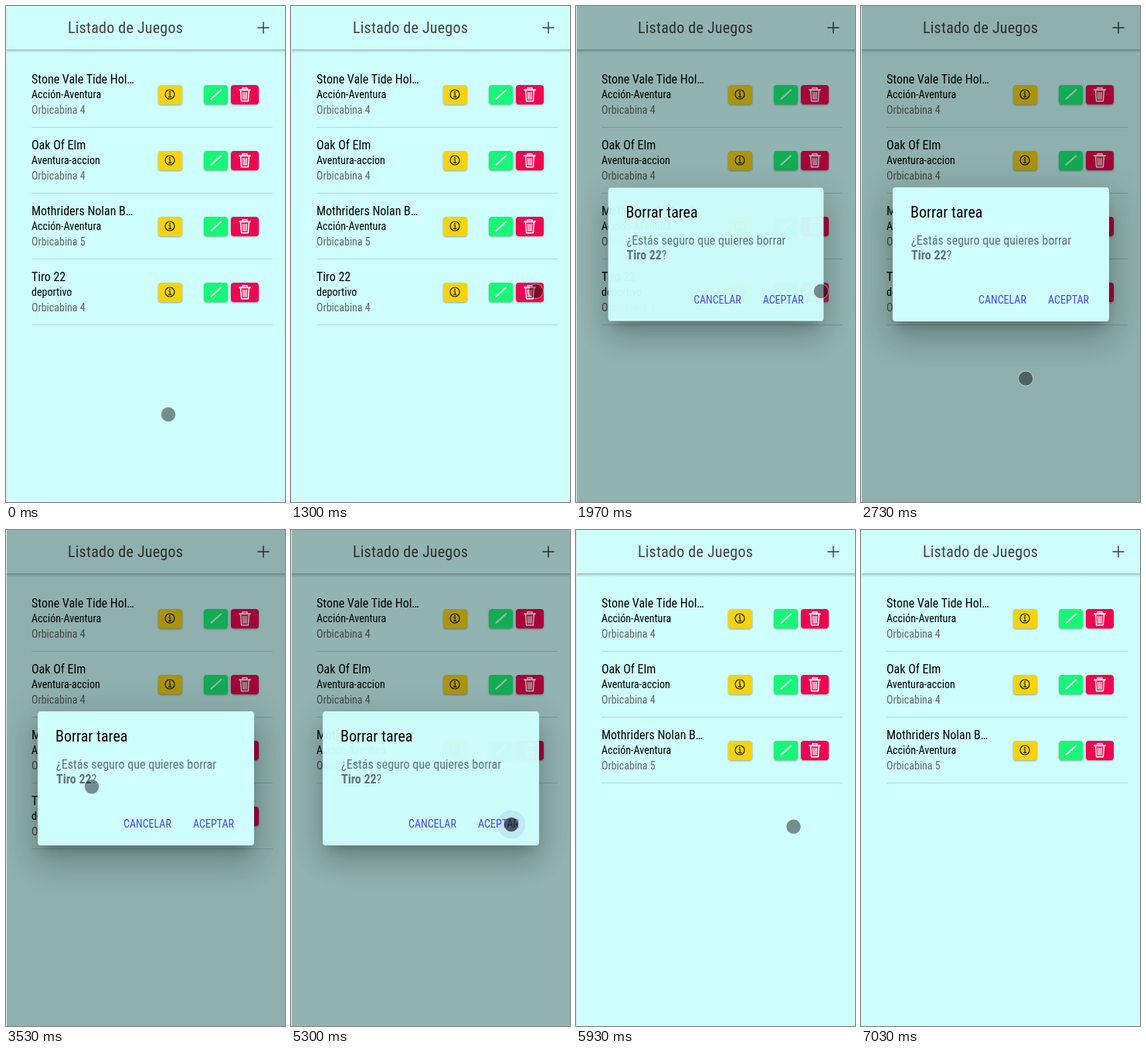
An HTML page for the animation above (8 s loop, 361 px wide and 640 px high).

```html
<!DOCTYPE html>
<html lang="es">
<head>
<meta charset="utf-8">
<title>Listado de Juegos</title>
<style>
  html, body { margin: 0; width: 100%; height: 100%; overflow: hidden; background: #cefffc; }
  #stage { position: relative; width: 361px; height: 640px; overflow: hidden; background: #cefffc; }
  svg { position: absolute; left: 0; top: 0; overflow: visible; }
  text, .probe { font-family: "Roboto Condensed", Roboto, sans-serif; font-stretch: 75%; white-space: pre; }
  text { transform-box: fill-box; transform-origin: 0 0; transform: scaleX(var(--narrow, 1)); }
  .probe { position: absolute; visibility: hidden; font-size: 100px; }
  .probe.wide { font-family: Roboto, sans-serif; font-stretch: 100%; }
  .bar { font-size: 20px; letter-spacing: .0125em; fill: #424242; }
  .name { font-size: 16px; }
  .kind { font-size: 14px; }
  .console { font-size: 14px; fill: #666; }
  .btn { filter: drop-shadow(0 1px 1.3px rgba(0, 0, 0, .35)); }
  #dim { position: absolute; left: 1px; top: 0; width: 360px; height: 640px; background: #000; }
  #dialog {
    position: absolute; left: 41px; top: 234px; width: 280px; height: 173px;
    border-radius: 4px; background: #cefffc;
    box-shadow: 0 11px 15px -7px rgba(0, 0, 0, .2), 0 24px 38px 3px rgba(0, 0, 0, .14), 0 9px 46px 8px rgba(0, 0, 0, .12);
  }
  .head { font-size: 20px; }
  .msg { font-size: 16px; fill: #5d7371; }
  .msg tspan { font-weight: 700; }
  .act { font-size: 14px; fill: #4747d9; }
</style>
</head>
<body>
<div id="stage">
  <svg width="361" height="640">
    <defs>
      <linearGradient id="edge" x2="0" y2="1">
        <stop stop-opacity=".3"/>
        <stop offset=".35" stop-opacity=".12"/>
        <stop offset="1" stop-opacity="0"/>
      </linearGradient>
      <clipPath id="trashClip"><rect x="291" y="357" width="36" height="25" rx="4"/></clipPath>
      <clipPath id="okClip"><rect x="232" y="359" width="73" height="40" rx="2"/></clipPath>
      <g id="tools">
        <g class="btn">
          <rect x="197" y="102" width="31" height="25" rx="4" fill="#f6d30e"/>
          <rect x="256" y="102" width="31" height="25" rx="4" fill="#17f777"/>
          <rect x="291" y="102" width="36" height="25" rx="4" fill="#ec0650"/>
        </g>
        <g fill="none" stroke="#222" stroke-width="1.2">
          <circle cx="212" cy="114" r="6"/>
          <path d="M210.5 113h1.7v4M210.2 117.3h4"/>
          <circle cx="212" cy="110.7" r=".4"/>
        </g>
        <path d="M265.5 119.8L276.3 110M277.3 109.1l.8-.7" stroke="#e4fff0" stroke-width="2.2" stroke-linecap="round"/>
        <g fill="none" stroke="#fff" stroke-linecap="round" stroke-linejoin="round">
          <path stroke-width="1.9" d="M302 108.3h14"/>
          <path stroke-width="1.5" d="M306 107.5v-1.8h6v1.8M303.7 109.5l.9 13.3h8.8l.9-13.3"/>
          <path stroke-width="1.3" d="M306.7 111.5l.3 8.8M309 111.5v8.8M311.3 111.5l-.3 8.8"/>
        </g>
      </g>
    </defs>
    <rect width="1" height="640" fill="#e2e8e8"/>
    <rect x="1" y="56" width="360" height="5" fill="url(#edge)"/>
    <text class="bar" x="80" y="35">Listado de Juegos</text>
    <path d="M325.5 28h15M333 20.5v15" stroke="#424242" stroke-width="1.5"/>
    <g id="rows"></g>
    <g clip-path="url(#trashClip)"><circle id="trashRipple" cx="317" cy="368" fill="#fff" fill-opacity=".15"/></g>
  </svg>
  <div id="dim"></div>
  <div id="dialog">
    <svg width="280" height="173" viewBox="41 234 280 173">
      <text class="head" x="64" y="273">Borrar tarea</text>
      <text class="msg" x="65" y="308">¿Estás seguro que quieres borrar</text>
      <text class="msg" x="65" y="327"><tspan>Tiro 22</tspan>?</text>
      <g clip-path="url(#okClip)"><circle id="okRipple" cx="285" cy="380" fill="#4747d9" fill-opacity=".1"/></g>
      <text class="act" x="152" y="384">CANCELAR</text>
      <text class="act" x="242" y="384">ACEPTAR</text>
    </svg>
  </div>
  <svg width="361" height="640">
    <circle id="cursor" r="9.5" stroke="#fff" stroke-opacity=".45"/>
  </svg>
  <span class="probe">Listado</span><span class="probe wide">Listado</span>
</div>
<script>
const $ = id => document.getElementById(id);
const LOOP = 8000;

const games = [
  ['Stone Vale Tide Hol…', 'Acción-Aventura', 'Orbicabina 4'],
  ['Oak Of Elm', 'Aventura-accion', 'Orbicabina 4'],
  ['Mothriders Nolan B…', 'Acción-Aventura', 'Orbicabina 5'],
  ['Tiro 22', 'deportivo', 'Orbicabina 4']
];
$('rows').innerHTML = games.map(([name, kind, machine], i) => `
  <g transform="translate(0 ${i * 85})">
    <text class="name" x="33" y="100">${name}</text>
    <text class="kind" x="33" y="119">${kind}</text>
    <text class="console" x="33" y="139">${machine}</text>
    <use href="#tools"/>
    <rect x="33" y="156" width="312" height="1" fill-opacity=".14"/>
  </g>`).join('');
const lastRow = $('rows').lastElementChild;

// Without a condensed face, narrow the regular one evenly.
const [slim, wide] = [...document.querySelectorAll('.probe')].map(p => p.offsetWidth);
if (slim > wide * .95) document.documentElement.style.setProperty('--narrow', .885);

// Pointer moves: start, step length, step count, Bezier points.
const moves = [
  [330, 100, 9, [210, 527], [155, 490], [230, 400], [297, 377]],
  [1300, 100, 1, [297, 377], [300, 376], [310, 370], [317, 368]],
  [2430, 100, 11, [317, 368], [250, 560], [70, 490], [70, 306]],
  [3530, 100, 9, [70, 306], [196, 362], [300, 620], [285, 380]],
  [5830, 100, 3, [285, 380], [284, 381], [281, 383], [280, 384]],
  [6170, 95, 9, [280, 384], [278, 435], [200, 250], [198, 59]],
  [7000, 100, 1, [198, 59], [198, 56], [198, 53], [198, 50]]
];

const clamp = v => Math.min(1, Math.max(0, v));
const ease = v => { const u = clamp(v); return u * u * (3 - 2 * u); };

function pointer(t) {
  const move = moves.filter(m => m[0] <= t).pop();
  if (!move) return moves[0][3];
  const [start, step, count, a, b, c, d] = move;
  const u = clamp((Math.floor((t - start) / step) + 1) / count), v = 1 - u;
  return [0, 1].map(k => v * v * v * a[k] + 3 * v * v * u * b[k] + 3 * v * u * u * c[k] + u * u * u * d[k]);
}

function render(t) {
  const enter = ease((t - 1840) / 150);
  const leave = t < 5300 ? 0 : ease((t - 5283) / 150);
  const shown = enter * (1 - leave);
  $('dim').style.opacity = .31 * shown;
  $('dialog').style.opacity = shown;
  $('dialog').style.transform = enter < 1 ? `scale(${.9 + .1 * enter})` : 'none';
  lastRow.style.display = t < 5300 ? '' : 'none';

  $('trashRipple').setAttribute('r', t >= 1800 && t < 2300 ? 10 + (t - 1800) * .2 : 0);
  $('okRipple').setAttribute('r', t >= 5300 && t < 5450 ? 18 + (t - 5300) * .32 : 0);

  const [x, y] = pointer(t), cursor = $('cursor');
  cursor.setAttribute('cx', x);
  cursor.setAttribute('cy', y);
  cursor.setAttribute('fill-opacity', t >= 5300 && t < 5830 ? .62 : .44);
  cursor.style.display = t < 7030 ? '' : 'none';
}

const began = performance.now();
function tick() {
  render((performance.now() - began) % LOOP);
  requestAnimationFrame(tick);
}
tick();
</script>
</body>
</html>
```
